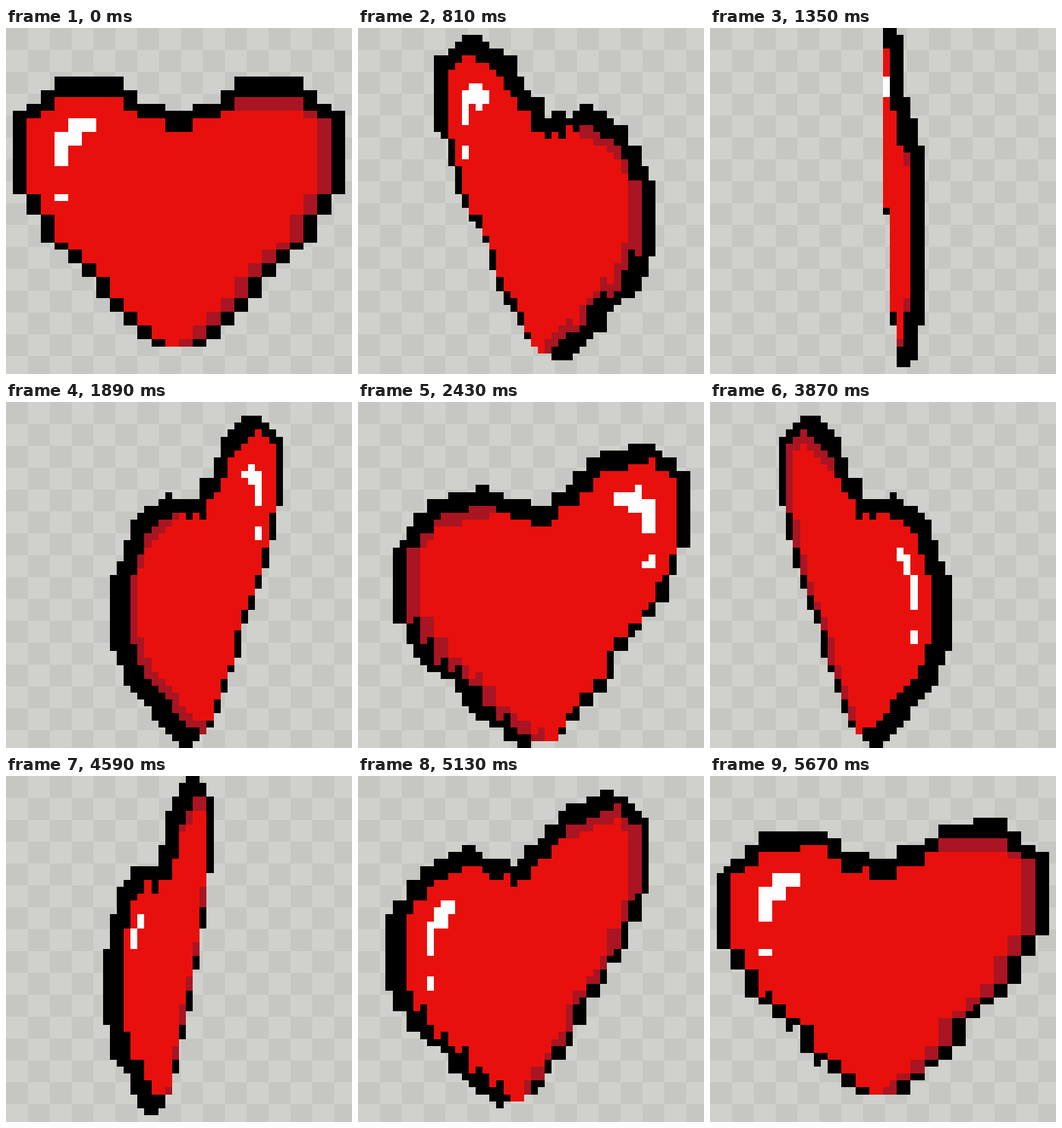
An HTML page with a canvas for the animation above (5.76 s loop, 506 by 506 pixels).

```html
<!DOCTYPE html>
<html lang="en">
<head>
<meta charset="utf-8">
<title>Spinning pixel heart</title>
<style>
  html, body { margin: 0; width: 100%; height: 100%; overflow: hidden; background: #d0d1cc; }
  canvas { display: block; width: 100vw; height: 100vh; image-rendering: pixelated; }
</style>
</head>
<body>
<canvas id="stage" width="506" height="506"></canvas>
<script>
const SIZE = 506, GRID = 50, STEPS = 64, STEP_MS = 90;
const COLS = 24, ROWS = 22, UNIT = 2;
const FRONT = -2, BACK = -4;            // slab depth, relative to the pivot
const CX = 25, CY = 28.21;              // pivot on the grid
const TILT = Math.PI / 6, SIN_T = Math.sin(TILT), COS_T = Math.cos(TILT);
const REACH = 26, MARCH = 0.04;
const INK = { k: '#000000', r: '#e8100d', d: '#a91522', w: '#fdfdfd' };

const ctx = document.getElementById('stage').getContext('2d');
const edge = i => Math.round(i * SIZE / GRID);

// Left outline column for each row below the lobes; the right side mirrors it.
const outline = [0, 0, 0, 0, 0, 0, 1, 1, 2, 2, 3, 4, 5, 6, 6, 7, 8, 9, 10];

function buildHeart() {
  const rows = Array.from({ length: ROWS }, () => Array(COLS).fill(null));
  const put = (row, from, to, ink) => rows[row].fill(ink, from, to + 1);
  put(0, 3, 7, 'k');
  put(0, 16, 20, 'k');
  put(1, 2, 8, 'k');
  put(1, 15, 21, 'k');
  put(1, 3, 7, 'r');
  put(1, 16, 20, 'd');
  put(2, 1, 10, 'k');
  put(2, 13, 22, 'k');
  put(2, 2, 8, 'r');
  put(2, 15, 20, 'r');
  put(2, 21, 21, 'd');
  outline.forEach((left, i) => {
    const row = i + 3, right = COLS - 1 - left;
    put(row, left, right, 'k');
    put(row, left + 1, right - 2, 'r');
    put(row, right - 1, right - 1, 'd');
  });
  put(3, 11, 12, 'k');
  put(3, 4, 5, 'w');
  put(4, 3, 4, 'w');
  put(5, 3, 3, 'w');
  put(6, 3, 3, 'w');
  put(9, 3, 3, 'w');
  return rows;
}

const heart = buildHeart();

// Follow the view ray of one cell from near to far through the slab.
function castRay(col, row, sin, cos) {
  const u = col + 0.5 - CX, v = row + 0.5 - CY;
  const a = (FRONT + u * sin) / cos, b = (BACK + u * sin) / cos;
  const near = Math.min(REACH, Math.max(a, b));
  const far = Math.max(-REACH, Math.min(a, b));
  for (let d = near; d >= far; d -= MARCH) {
    const x = u * cos + d * sin, y = (v - SIN_T * d) / COS_T;
    const line = heart[Math.floor(y / UNIT + ROWS / 2)];
    const ink = line && line[Math.floor(x / UNIT + COLS / 2)];
    if (ink) return ink;
  }
  return null;
}

function drawChecks() {
  const s = 32;
  ctx.fillStyle = '#d0d1cc';
  ctx.fillRect(0, 0, SIZE, SIZE);
  ctx.fillStyle = '#c6c7c2';
  for (let j = 0; j * s < SIZE; j++)
    for (let i = j % 2; i * s < SIZE; i += 2) ctx.fillRect(i * s, j * s, s, s);
}

function draw(step) {
  const angle = step / STEPS * 2 * Math.PI;
  const sin = Math.sin(angle), cos = Math.cos(angle);
  drawChecks();
  for (let row = 0; row < GRID; row++) {
    for (let col = 0; col < GRID; col++) {
      const ink = castRay(col, row, sin, cos);
      if (!ink) continue;
      const x = edge(col), y = edge(row);
      ctx.fillStyle = INK[ink];
      ctx.fillRect(x, y, edge(col + 1) - x, edge(row + 1) - y);
    }
  }
}

let shown = 0;
function tick() {
  const step = Math.floor(performance.now() / STEP_MS) % STEPS;
  if (step !== shown) draw(shown = step);
  requestAnimationFrame(tick);
}
draw(0);
tick();
</script>
</body>
</html>
```
